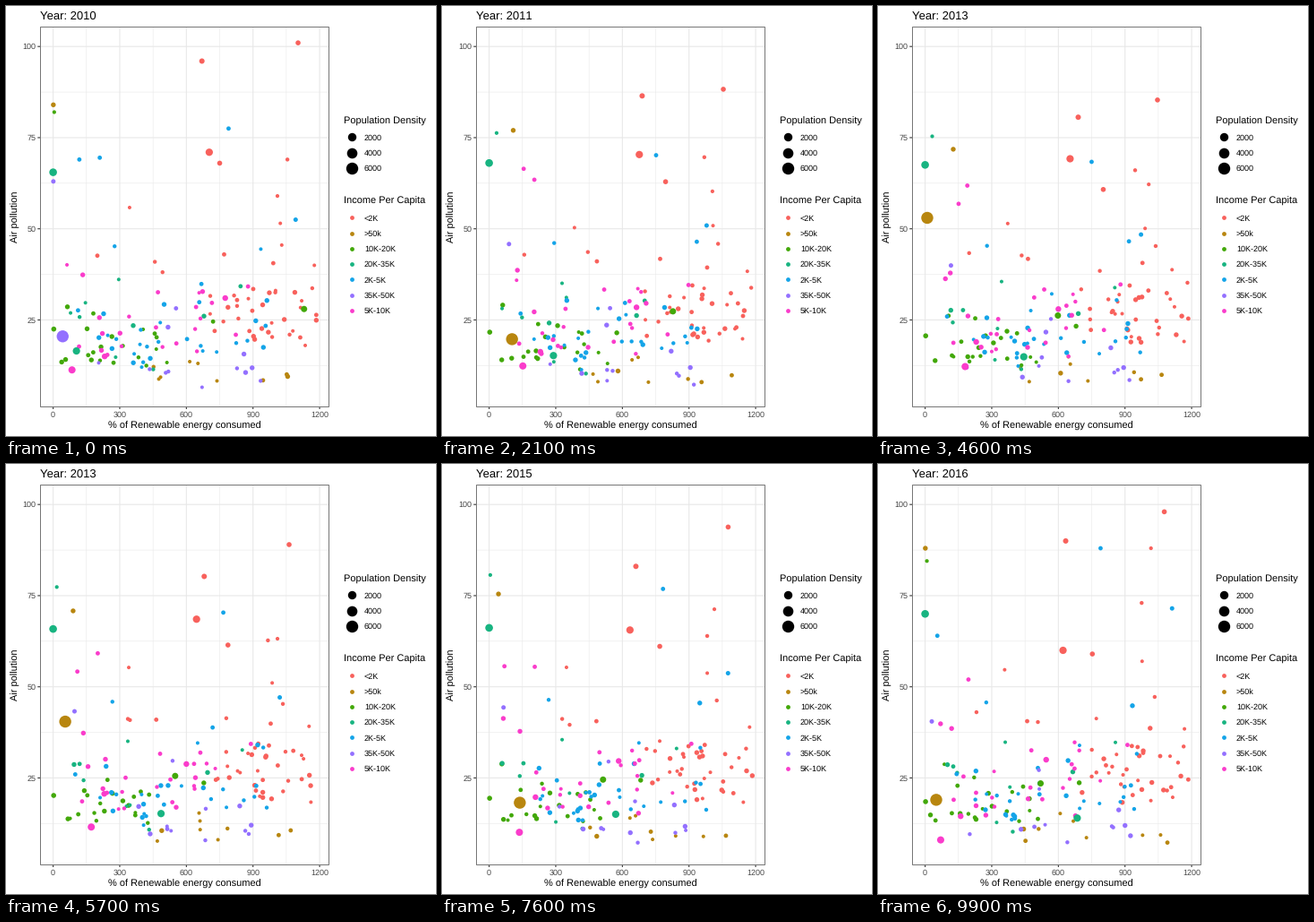
Write a matplotlib script that moves like this. It is 480x480 px and loops after 10000 ms.

```python
import numpy as np
import matplotlib.pyplot as plt
from matplotlib.animation import FuncAnimation
from matplotlib.colors import to_rgb

plt.rcParams.update({"font.family": "Liberation Sans", "text.hinting": "none",
                     "text.hinting_factor": 1})

SIZE, DPI = 480, 80
FRAMES, INTERVAL = 100, 100
PT = 72 / DPI                          # points per pixel
INCOME = {
    "r": ("<2K", "#F8615C"), "o": (">50k", "#B8860F"),
    "g": ("10K-20K", "#42A809"), "t": ("20K-35K", "#18B481"),
    "b": ("2K-5K", "#14A4E8"), "v": ("35K-50K", "#9370FF"),
    "p": ("5K-10K", "#FA3CCB"),
}
rng = np.random.default_rng(12)
years = np.linspace(0, 6, FRAMES)      # years since 2010
points = []                            # (x, y, radius, rgb) over all frames


def px(x):
    return 52.6 + 0.2479 * np.asarray(x)


def py(y):
    return 452.2 - 4.07 * np.asarray(y)


def track(cols, r, *path):
    """Move evenly in time along path, stepping through the colours of cols."""
    xs, ys = zip(*path)
    stops = np.linspace(0, 6, len(path))
    step = np.minimum((years / 6 * len(cols)).astype(int), len(cols) - 1)
    rgb = [to_rgb(INCOME[cols[k]][1]) for k in step]
    points.append((px(np.interp(years, stops, xs)),
                   py(np.interp(years, stops, ys)), np.full(FRAMES, r), rgb))


def crowd(col, n, span, ab, low, shape, scale):
    """Small dots drifting from year to year; a few trade places.

    Positions are beta-distributed over span, heights have a long upper tail.
    """
    home = np.column_stack([span[0] + (span[1] - span[0]) * rng.beta(*ab, n),
                            low + rng.gamma(shape, scale, n)])
    order, yearly = np.arange(n), []
    for _ in range(7):
        yearly.append(home[order] + rng.normal(0, (18, 0.9), (n, 2)))
        a = rng.integers(n)
        b = a + max(2, n // 3)
        order[a:b] = np.roll(order[a:b], 1)
    paths = np.clip(yearly, (2, 6), (1185, 56))
    radii = rng.choice([2, 2.2, 2.4, 2.7], n)
    for i in range(n):
        track(col, radii[i], *paths[:, i])


crowd("r", 38, (700, 1200), (1.2, 1.1), 16.5, 2.2, 6)
crowd("r", 4, (150, 640), (1, 1), 38, 2, 3)
crowd("o", 9, (380, 1150), (1, 1), 7, 2, 1.7)
crowd("g", 21, (40, 900), (1.1, 2), 8.5, 3, 3.6)
crowd("t", 9, (30, 1000), (1, 1.6), 8, 2, 5.5)
crowd("b", 31, (40, 1000), (1.2, 1.3), 11, 2.2, 5.5)
crowd("v", 12, (100, 1100), (1, 1.2), 6.5, 1.6, 4)
crowd("p", 23, (30, 930), (1.3, 1.8), 13, 3, 3.7)

# dots that stand clear of the crowd
track("r", 2.8, (1103, 101), (1027, 81), (1076, 92), (1077, 98))
track("r", 3, (670, 96), (700, 81), (673, 80), (633, 90))
track("r", 4.1, (703, 71), (661, 70), (640, 68), (621, 60))
track("r", 2.8, (750, 68), (820, 60), (775, 62), (753, 59))
track("r", 2.2, (1055, 69), (920, 70), (985, 60), (975, 73))
track("r", 2.1, (1010, 59), (1003, 61), (1013, 64), (1017, 88))
track("r", 2, (1023, 51.5), (988, 50), (977, 57))
track("o", 2.7, (1, 84), (170, 73), (60, 70), (1, 88))
track("g", 2.8, (3, 22.5), (2, 18.5))
track("g", 3.5, (1130, 28), (655, 27), (510, 25), (520, 23.5))
track("gttttg", 2.1, (5, 82), (50, 73), (4, 79), (8, 84.5))
track("t", 4.3, (0, 65.5), (0, 69.5), (0, 64.5), (0, 70))
track("t", 4.1, (105, 16.5), (395, 14.5), (520, 15.5), (685, 14))
track("b", 2.4, (790, 77.5), (730, 66), (780, 72), (790, 88))
track("b", 2.5, (1092, 52.5), (915, 50), (1060, 46), (1112, 71.5))
track("bppppp", 2.4, (118, 69), (177, 65), (210, 57), (195, 52))
track("bppppb", 2.4, (210, 69.5), (200, 60), (75, 52), (55, 64))
track("v", 2.5, (1, 63), (140, 36), (80, 46), (30, 40.5))
track("p", 4, (85, 11.3), (190, 13), (165, 11), (70, 8))
track("p", 3.2, (232, 15), (230, 17), (230, 22), (160, 14.5))
track("p", 3.2, (775, 31), (600, 27), (600, 29.5), (545, 30))
track("vooooo", 6.7, (43, 20.5), (125, 17), (45, 27), (0, 60), (120, 17),
      (150, 19), (50, 19))

X, Y, R, RGB = (np.array(part) for part in zip(*points))

fig = plt.figure(figsize=(SIZE / DPI, SIZE / DPI), dpi=DPI, facecolor="white")
ax = fig.add_axes([0, 0, 1, 1])
ax.set(xlim=(0, SIZE), ylim=(SIZE, 0))
ax.axis("off")


def label(x, y, s, size, color="black", **kw):
    return ax.text(x, y, s, fontsize=size * PT, color=color,
                   va="baseline", **kw)


def line(x, y, color, width, z):
    ax.plot(x, y, color=color, lw=width * PT, zorder=z,
            solid_capstyle="butt", snap=False)


def area(r):
    return (2 * np.asarray(r) * PT) ** 2


LEFT, RIGHT, TOP, BOTTOM = 38, 360, 23, 447
GRID, DARK, GREY = "#E8E8E8", "#333333", "#444444"

for i in range(9):
    x, w = px(150 * i), 0.55 if i % 2 else 1.1
    line([x, x], [TOP, BOTTOM], GRID, w, 1)
    if i % 2 == 0:
        line([x, x], [BOTTOM, BOTTOM + 3], DARK, 1.1, 2)
        label(x, 459.3, str(150 * i), 8.8, GREY, ha="center")
for i in range(1, 9):
    y, w = py(12.5 * i), 0.55 if i % 2 else 1.1
    line([LEFT, RIGHT], [y, y], GRID, w, 1)
    if i % 2 == 0:
        line([LEFT - 2.7, LEFT], [y, y], DARK, 1.1, 2)
        label(33.2, y + 3.2, f"{12.5 * i:.0f}", 8.8, GREY, ha="right")
ax.add_patch(plt.Rectangle((LEFT, TOP), RIGHT - LEFT, BOTTOM - TOP, fill=False,
                           ec="#777777", lw=PT, zorder=5))

label(199.5, 472, "% of Renewable energy consumed", 11, ha="center")
label(13.5, 235.5, "Air pollution", 11, ha="center", rotation=90,
      rotation_mode="anchor")
title = label(37.8, 15, "Year: 2010", 13.2)

label(377, 132, "Population Density", 11)
for i, r in enumerate([4.7, 5.8, 6.7]):
    y = 146.3 + 17.3 * i
    ax.scatter([386], [y], s=area(r), c="black", lw=0)
    label(400, y + 3.2, str(2000 * (i + 1)), 8.8)
label(377, 221, "Income Per Capita", 11)
for i, (name, color) in enumerate(INCOME.values()):
    y = 236.3 + 17.28 * i
    ax.scatter([386], [y], s=area(2.4), c=color, lw=0)
    label(400, y + 3.2, name, 8.8)

dots = ax.scatter(X[:, 0], Y[:, 0], s=area(R[:, 0]), c=RGB[:, 0], lw=0,
                  zorder=3)


def draw(i):
    dots.set_offsets(np.column_stack([X[:, i], Y[:, i]]))
    dots.set_sizes(area(R[:, i]))
    dots.set_facecolor(RGB[:, i])
    title.set_text(f"Year: {2010 + round(years[i])}")
    return dots, title


anim = FuncAnimation(fig, draw, frames=FRAMES, interval=INTERVAL, repeat=True)
plt.show()
```
